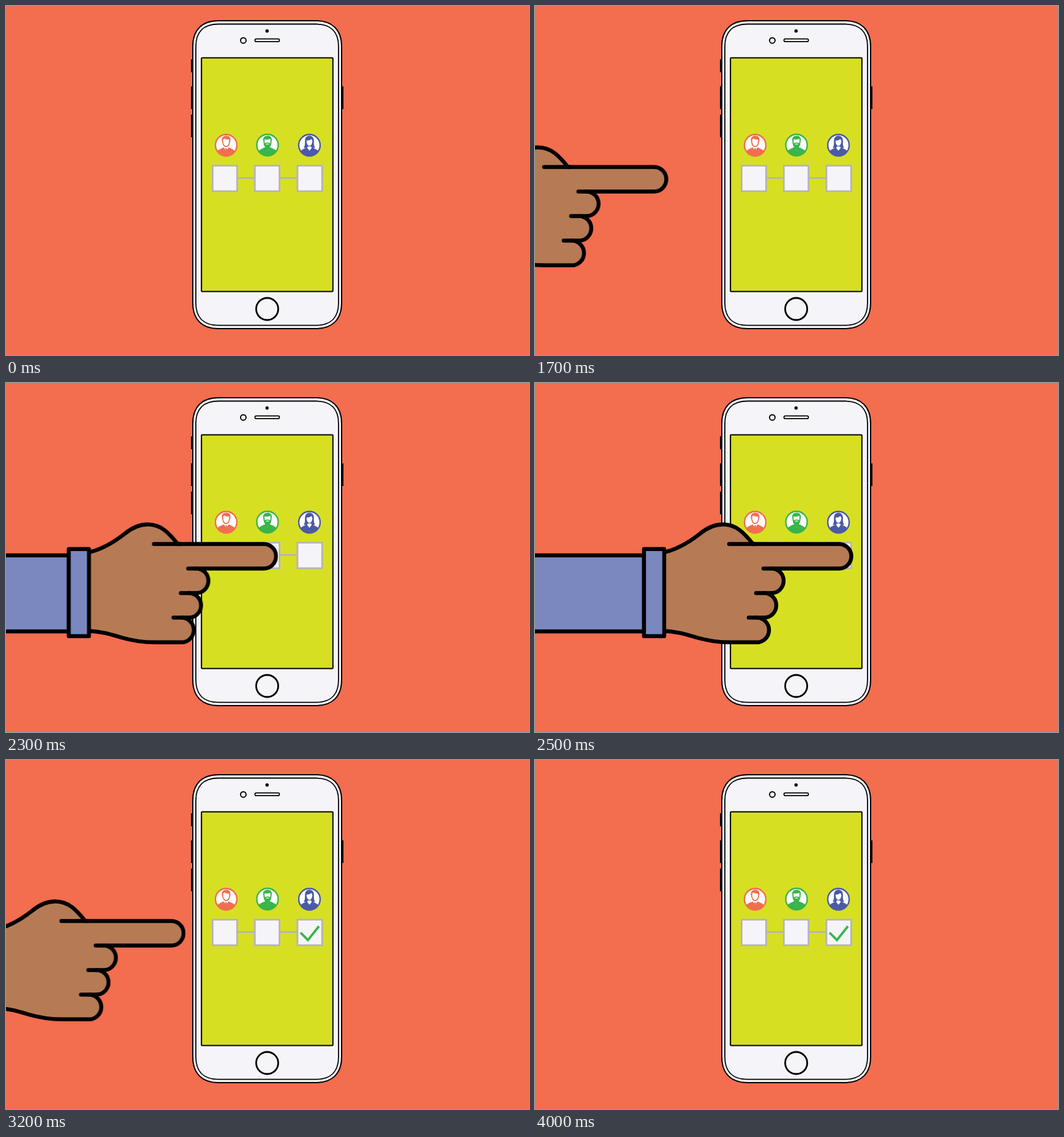
An HTML page for the animation above (5.2 s loop, 854 by 569 pixels).

```html
<!DOCTYPE html>
<html lang="en">
<head>
<meta charset="utf-8">
<title>Tap to approve</title>
<style>
  html, body { margin: 0; width: 100%; height: 100%; overflow: hidden; background: #f36d4f; }
  svg { display: block; width: 100%; height: 100%; }
  .line { fill: none; stroke: #000; }
  .paper { fill: #f5f4f8; }
  .box { fill: #f5f4f8; stroke: #b5b4b9; stroke-width: 2.8; }
  .thick { stroke: #000; stroke-width: 6.4; stroke-linecap: round; stroke-linejoin: round; }
  .skin { fill: #b67b55; }
  .cloth { fill: #7b87bf; }
  .avatar { fill: currentColor; stroke: none; }
  .avatar .ring { fill: #fff; stroke: currentColor; stroke-width: 2.4; }
  .avatar .face { fill: #fff; stroke: currentColor; stroke-width: 1.8; }

  .hand { animation: reach 5200ms infinite; }
  .check { animation: tick 5200ms infinite step-end; }

  /* one stride every 100 ms, out and back */
  @keyframes reach {
    0%      { transform: translateX(-340px); animation-timing-function: step-end; }
    23.076% { transform: translateX(-302px); animation-timing-function: steps(14, jump-none); }
    49.999% { transform: translateX(189px); animation-timing-function: steps(14, jump-none); }
    76.922% { transform: translateX(-302px); animation-timing-function: step-end; }
    76.923%, 100% { transform: translateX(-340px); }
  }
  @keyframes tick {
    0% { opacity: 0; }
    49.999%, 100% { opacity: 1; }
  }
</style>
</head>
<body>
<svg viewBox="0 0 854 569" preserveAspectRatio="none">
  <defs>
    <clipPath id="disc"><circle r="18"/></clipPath>
    <path id="torso" clip-path="url(#disc)"
      d="M-15 19V11Q-13.500 7.500 -9.500 6L-4 3.600L0 9L4 3.600L9.500 6Q13.500 7.500 15 11V19Z"/>
  </defs>

  <rect width="854" height="569" fill="#f36d4f"/>

  <!-- phone -->
  <path d="M302 87h4v21h-4zM302 131h4v37h-4zM302 177h4v37h-4zM547 131h4v37h-4z"/>
  <path class="line paper" style="fill:#f5f4f8" stroke-width="2"
    d="M305 66C305 39 320 24 347 24H506C533 24 548 39 548 66V484C548 511 533 526 506 526H347C320 526 305 511 305 484Z"/>
  <path class="line" stroke-width="1.800"
    d="M310 66C310 42 323 29.500 347 29.500H506C530 29.500 543 42 543 66V484C543 508 530 520.700 506 520.700H347C323 520.700 310 508 310 484Z"/>
  <circle cx="426.300" cy="40.700" r="2.700"/>
  <circle class="line" cx="387.500" cy="56.200" r="4.500" stroke-width="1.900"/>
  <rect class="line" x="406.500" y="53.700" width="40" height="4.500" rx="2.250" stroke-width="1.700"/>
  <circle class="line" cx="426.500" cy="494" r="18" stroke-width="2.800"/>
  <rect x="319.200" y="84.500" width="214.600" height="381" rx="1" fill="#d7df23" stroke="#000" stroke-width="2"/>

  <!-- people -->
  <g class="avatar" color="#f36d4f" transform="translate(359.500 227)">
    <circle class="ring" r="17.500"/>
    <use href="#torso"/>
    <path class="face" d="M-5.800 -8C-5.800 -2 -3.500 2.200 0 2.200S5.800 -2 5.800 -8C5.800 -16 -5.800 -16 -5.800 -8Z"/>
    <path d="M-6.800 -6C-8 -12 -5 -15.600 0 -15.500C6 -15.600 8 -11 6.800 -6L5 -9.500Q0 -8.500 -3 -11L-5.200 -9Z"/>
    <path d="M-1.500 5h3l-.5 2.500L2 14h-4L-1 7.500Z"/>
  </g>
  <g class="avatar" color="#39b54a" transform="translate(427 226.700)">
    <circle class="ring" r="17.500"/>
    <use href="#torso"/>
    <path d="M-4 2h8v3L0 9L-4 5Z"/>
    <path class="face" d="M-5.800 -8C-5.800 -1 -3.500 3 0 3S5.800 -1 5.800 -8C5.800 -16 -5.800 -16 -5.800 -8Z"/>
    <path d="M-6.800 -6C-8 -12 -5 -15.500 0 -15C5 -16 8 -11 6.800 -6L5 -10.500Q0 -8 -5 -9.500Z"/>
    <path d="M-6.300 -6L-4.500 -3Q0 -5.500 4.500 -3L6.300 -6C6.500 1 4 4.600 0 4.600S-6.500 1 -6.300 -6Z"/>
    <path d="M-2.300 -1.600h4.600" stroke="#fff" stroke-width="1.300"/>
  </g>
  <g class="avatar" color="#4b5aa6" transform="translate(495.500 227)">
    <circle class="ring" r="17.500"/>
    <use href="#torso"/>
    <path d="M-9.500 4C-6 0 -8 -6 -7 -10C-6 -14 -3 -15.500 0 -15.500S6 -14 7 -10C8 -6 6 0 9.500 4L4 5L2.500 2H-2.500L-4 5Z"/>
    <path fill="#fff" d="M-4.700 -7.500Q0 -7.500 3 -10L4.700 -7.500C4.700 -2 2.600 1 0 1S-4.700 -2 -4.700 -7.500ZM-2.500 2.500h5L3.300 5L0 8.500L-3.300 5Z"/>
  </g>

  <!-- linked boxes -->
  <path d="M378 280.300H405M448 280.300H475" stroke="#b5b4b9" stroke-width="2.800"/>
  <rect class="box" x="337.400" y="260.300" width="40" height="41.700"/>
  <rect class="box" x="406.300" y="260.300" width="40.300" height="41.700"/>
  <rect class="box" x="475.900" y="260.300" width="40.300" height="41.700"/>
  <path class="check" d="M481 281.500L493 293.700L511 271" fill="none" stroke="#39b54a" stroke-width="3.800"/>

  <!-- pointing hand -->
  <g class="hand">
    <path class="thick skin" d="M18 277C42 272 61 261 80 246C92 236 105 230.500 118 230.500C140 230.500 153 245 167 262.500
      H307.500A20 20 0 0 1 307.500 302.500H197A20 20 0 0 1 197 342.500H185A20 20 0 0 1 185 382.500H173
      A20 20 0 0 1 173 422.800H130C110 422.800 92 420 75 415C60 410.500 45 405 18 404Z"/>
    <path class="thick" fill="none" d="M128 262.500H170M184 302.500H198M172 342.500H186M160 382.500H174"/>
    <path class="thick cloth" d="M-260 281H-11V405H-260Z"/>
    <rect class="thick cloth" x="-11" y="270.800" width="33" height="141.900"/>
  </g>
</svg>
</body>
</html>
```
